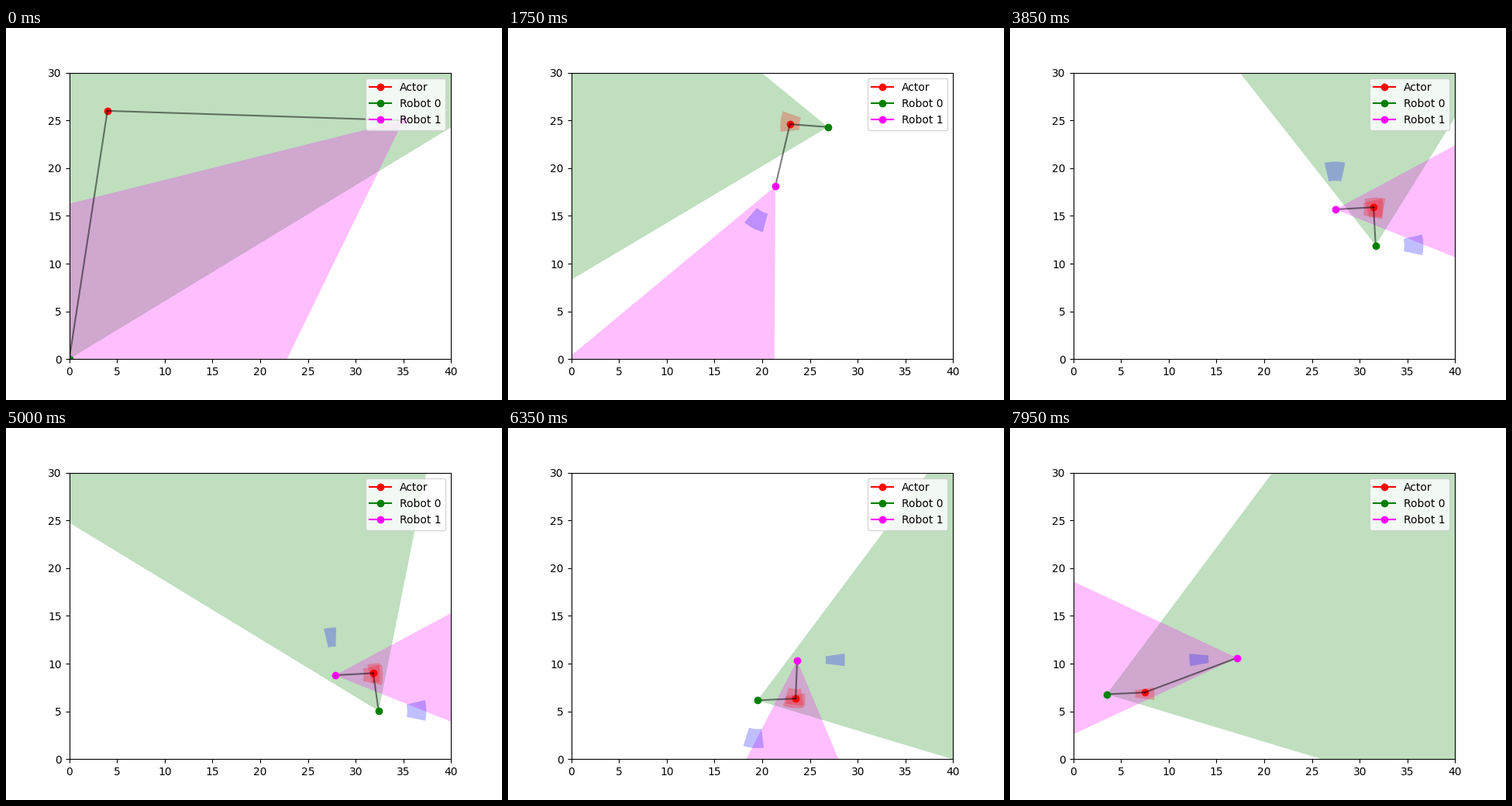
A matplotlib script for the animation above (8 s loop, 640 px wide and 480 px high).

```python
import numpy as np
import matplotlib.pyplot as plt
from matplotlib.animation import FuncAnimation
from matplotlib.patches import Wedge

FRAMES, INTERVAL = 160, 50
SPEED, TURN = 1.5, 15            # robot limits per frame
STAND_OFF, NEAR, FAR = 4, 3, 5
COLORS = ["green", "magenta"]
HALF_FOV = [35, 25]
ROUTE = np.array([(4, 26), (31, 24), (32, 6), (7, 7)], float)
TIMES = [0, 50, 110, 160]
SHIFT_AT = 88                    # robot 0 takes a skewed pose
SCOUT_UNTIL, LOST_AT = 35, 140   # robot 1 is off target outside these


def unit(deg):
    a = np.radians(deg)
    return np.array([np.cos(a), np.sin(a)])


def angle(v):
    return np.degrees(np.arctan2(v[1], v[0]))


def wrap(deg):
    return (deg + 180) % 360 - 180


def actor_at(n):
    pos = np.array([np.interp(n, TIMES, ROUTE[:, k]) for k in (0, 1)])
    leg = 0 if n <= TIMES[1] else 1 if n <= TIMES[2] else 2
    return pos, angle(ROUTE[leg + 1] - ROUTE[leg])


def approach(pos, goal):
    gap = goal - pos
    dist = np.hypot(*gap)
    return goal if dist <= SPEED else pos + gap * SPEED / dist


def rotate(yaw, aim):
    return yaw + np.clip(wrap(aim - yaw), -TURN, TURN)


def holds(pos, yaw, cell, actor):
    gap = actor - pos
    rel = wrap(angle(gap) - yaw)
    return NEAR <= np.hypot(*gap) <= FAR and cell[0] <= rel <= cell[1]


def simulate():
    start, scout_end = np.array([35.0, 25.0]), np.array([21.38, 18.12])
    pos, yaw = [np.zeros(2), start], [66.25, 219.0]
    states = []
    for n in range(FRAMES):
        actor, heading = actor_at(n)
        skewed = n >= SHIFT_AT
        cells = [(-25, -10) if skewed else (-15, 10),
                 (-5, 10) if n > LOST_AT else (-15, 10)]
        if n:
            goal = actor + STAND_OFF * unit(heading + 5 * skewed)
            pos[0] = approach(pos[0], goal)
            yaw[0] = rotate(yaw[0], angle(actor - pos[0]) + 15.5 * skewed)
            if n <= SCOUT_UNTIL:
                u = n / SCOUT_UNTIL
                pos[1] = start + (scout_end - start) * u
                yaw[1] = 219 + 25.7 * u
            elif n <= LOST_AT:
                pos[1] = approach(pos[1], actor + STAND_OFF * unit(heading - 90))
                yaw[1] = rotate(yaw[1], angle(actor - pos[1]))
            else:
                yaw[1] += wrap(180 - yaw[1]) / (FRAMES - n)
        hits = [holds(p, y, c, actor) for p, y, c in zip(pos, yaw, cells)]
        states.append((actor, list(pos), list(yaw), cells, hits))
    return states


STATES = simulate()

fig, ax = plt.subplots(figsize=(6.4, 4.8), dpi=100)
ax.set_aspect("equal")
ax.set_xlim(0, 40)
ax.set_ylim(0, 30)


def add_wedge(color, radius, width=None):
    return ax.add_patch(Wedge((0, 0), radius, 0, 1, width=width,
                              facecolor=color, alpha=0.25, linewidth=0))


def place(wedge, center, lo, hi):
    wedge.set_center(tuple(center))
    wedge.set_theta1(lo)
    wedge.set_theta2(hi)


views = [add_wedge(c, 80) for c in COLORS]
own = [add_wedge("red", FAR, FAR - NEAR) for _ in COLORS]
shared = [add_wedge("blue", FAR, FAR - NEAR) for _ in COLORS]

actor_dot, = ax.plot([], [], "-o", color="red", label="Actor")
links, dots = [], []
for i, c in enumerate(COLORS):
    links += ax.plot([], [], color="black", alpha=0.5)
    dots += ax.plot([], [], "-o", color=c, label=f"Robot {i}")
ax.legend(loc="upper right")


def update(n):
    actor, pos, yaw, cells, hits = STATES[n]
    actor_dot.set_data([actor[0]], [actor[1]])
    for i in (0, 1):
        p, j = pos[i], 1 - i
        dots[i].set_data([p[0]], [p[1]])
        links[i].set_data([actor[0], p[0]], [actor[1], p[1]])
        place(views[i], p, yaw[i] - HALF_FOV[i], yaw[i] + HALF_FOV[i])
        place(own[i], p, yaw[i] + cells[i][0], yaw[i] + cells[i][1])
        own[i].set_facecolor("red" if hits[i] else "blue")
        own[i].set_visible(n > 0)
        place(shared[i], p, yaw[j] + cells[j][0], yaw[j] + cells[j][1])
        shared[i].set_visible(all(hits))
    return [actor_dot, *links, *dots, *views, *own, *shared]


anim = FuncAnimation(fig, update, frames=FRAMES, interval=INTERVAL,
                     repeat=True, repeat_delay=0)
plt.show()
```
